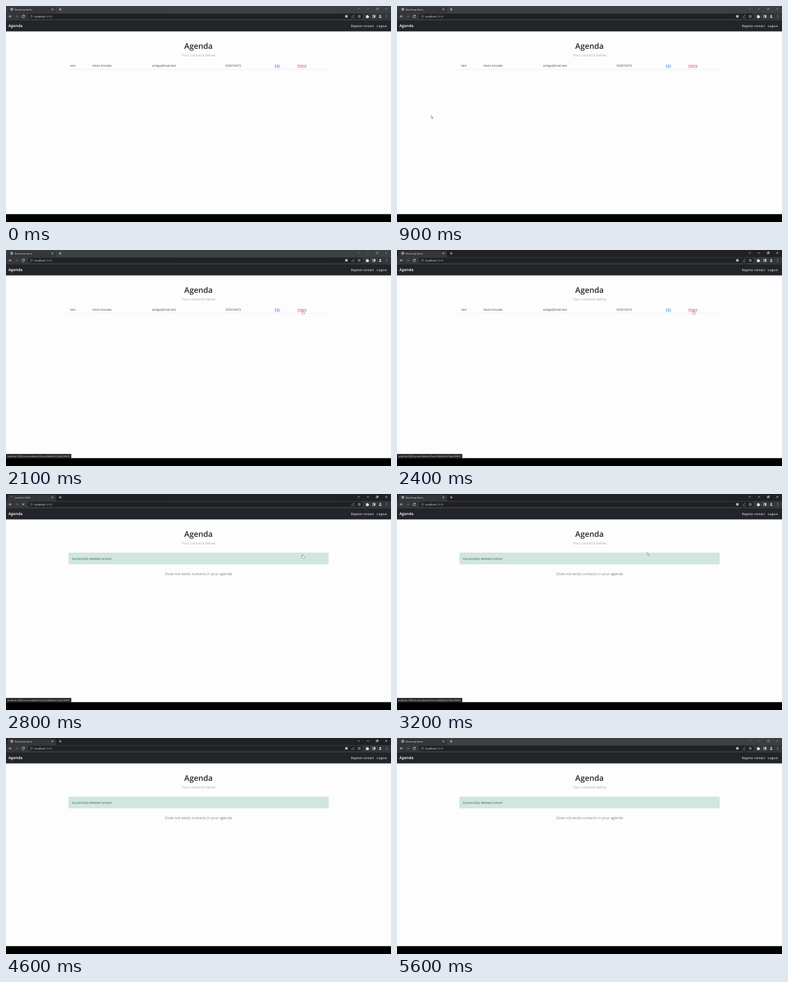
These frames come from a looping animation (600x338 px, 5.7 s). An HTML page:

```html
<!DOCTYPE html>
<html lang="en">
<head>
<meta charset="utf-8">
<title>Agenda</title>
<style>
html, body { margin: 0; width: 100%; height: 100%; overflow: hidden; background: #000; }
svg { display: block; width: 600px; height: 338px; font: 4.75px "Open Sans", "Noto Sans", sans-serif; text-rendering: geometricPrecision; }
.line { fill: none; stroke: #e8eaed; stroke-width: .65; }
.dim { stroke: #9aa0a6; }
.body { fill: #3b3f44; }
.lead { font-weight: 300; text-anchor: middle; }
.link { text-decoration: underline; }
.tab { font-size: 3.55px; fill: #e8eaed; }
.solid { fill: #e8eaed; }
</style>
</head>
<body>
<svg viewBox="0 0 600 338">
  <rect width="600" height="338"/>

  <!-- tab strip -->
  <rect id="strip" width="600" height="11.5"/>
  <path d="M0 11.5q2.4 0 2.4-2.4V3.4q0-2.2 2.2-2.2H75.6q2.2 0 2.2 2.2V9.1q0 2.4 2.4 2.4Z" fill="#35363a"/>
  <g id="globe">
    <circle cx="9" cy="5.2" r="1.9" class="line"/>
    <path d="M7.4 4.6 9 5.5 8.6 6.8M9.4 3.6 9.8 4.8 10.8 5" class="line" stroke-width=".5"/>
  </g>
  <path id="spinner" d="M9 3.3A1.9 1.9 0 0 1 10.9 5.2" class="line dim"/>
  <text id="title" x="13.8" y="6.5" class="tab"></text>
  <path d="M71.1 3.9 73.7 6.5M73.7 3.9 71.1 6.5M82.4 5.2h4.2M84.5 3.1v4.2" class="line"/>
  <g id="controls" class="line">
    <path d="M548 3.7 549.6 5.2 551.2 3.7M562.5 4.6h3.2M591.1 3.1 594.1 6.1M594.1 3.1 591.1 6.1"/>
    <path d="M577 3.8h2.3v2.3H577ZM577.8 3.8V3h2.3v2.3h-.8"/>
  </g>

  <!-- toolbar -->
  <rect y="11" width="600" height="12.3" fill="#35363a"/>
  <rect x="34" y="12.3" width="522" height="7.9" rx="3.95" fill="#202124"/>
  <path d="M9 16.2H4.8M6.8 14.2 4.8 16.2 6.8 18.2" class="line"/>
  <path d="M14.6 16.2h4.2M16.8 14.2 18.8 16.2 16.8 18.2" class="line" style="stroke:#74777b"/>
  <g id="reload">
    <path d="M28.3 14.8A2 2 0 1 0 28.9 16.7" class="line"/>
    <path d="M29 13.8V15.7H27.1Z" class="solid"/>
  </g>
  <path id="stop" d="M25.3 14.5 28.7 17.9M28.7 14.5 25.3 17.9" class="line"/>
  <circle cx="39.6" cy="16.2" r="1.8" class="line dim" style="stroke-width:.5"/>
  <path d="M39.6 15.9v1.2M39.6 15v.5" class="line dim" style="stroke-width:.5"/>
  <text x="44.2" y="17.7" font-size="4.15" fill="#f1f3f4">localhost<tspan fill="#9aa0a6">:3000</tspan></text>
  <rect id="translate" x="528.6" y="14.3" width="3.8" height="3.8" fill="#b6b9bd"/>
  <path d="M538.9 16v2.2h3.6V17M539.8 16.6Q540 15 542.6 14.9M541.5 13.8 542.7 14.9 541.5 16" class="line dim" style="stroke-width:.5"/>
  <path id="star" class="line" style="stroke-width:.5"/>
  <path d="M561 14.9h1.2a.8.8 0 0 1 1.6 0H565v1.2a.8.8 0 0 1 0 1.6v1h-4v-1.2a.8.8 0 0 0 0-1.4Z" class="solid"/>
  <path d="M571.3 14.4h3.8v3.7h-3.8Z" class="line"/>
  <path d="M573.4 14.4h1.8v3.7h-1.8ZM581.2 18.2q0-1.7 2-1.7t2 1.7Z" class="solid"/>
  <circle cx="583.2" cy="15" r="1.1" class="solid"/>
  <path d="M593.2 14v.8M593.2 15.8v.8M593.2 17.6v.8" class="line" style="stroke-width:.8"/>

  <!-- page -->
  <rect y="23.2" width="600" height="16.5" fill="#212529"/>
  <rect y="39.7" width="600" height="285.8" fill="#fdfdfe"/>
  <rect y="325.2" width="600" height=".6" fill="#b8d8c2"/>
  <g fill="#fff">
    <text x="3.8" y="33.3" font-size="6.05" font-weight="600">Agenda</text>
    <text x="537.5" y="32.8" font-size="4.8" font-weight="500">Register contact</text>
    <text x="578" y="32.8" font-size="4.8" font-weight="500">Logout</text>
  </g>
  <text x="300" y="67.2" font-size="12.2" font-weight="600" text-anchor="middle" fill="#212529">Agenda</text>
  <text x="300" y="79.4" font-size="5.8" class="lead" fill="#7b8187">Your contacts below</text>

  <g id="row" class="body">
    <text x="100" y="94.9">test</text>
    <text x="134.8" y="94.9">titulo trocado</text>
    <text x="227.8" y="94.9">amigo@mail.test</text>
    <text x="342" y="94.9">555010472</text>
    <text x="418.8" y="94.9" class="link" fill="#0d6efd">Edit</text>
    <text x="454" y="94.9" class="link" fill="#dc3545">Delete</text>
    <rect x="97" y="98.9" width="406" height=".4" fill="#d3d7db"/>
  </g>
  <g id="alert">
    <rect x="97.6" y="92" width="404.9" height="17.8" rx="1.3" fill="#d1e6dc" stroke="#bfdccf" stroke-width=".35"/>
    <text x="102.6" y="102.8" fill="#2d6049">Successfully deleted contact</text>
    <text x="300" y="127.1" font-size="5.85" class="lead body">Does not exists contacts in your agenda</text>
  </g>

  <g id="status">
    <rect y="319.2" width="101.7" height="6.6" fill="#202124"/>
    <text x="1.8" y="323.8" font-size="3.5" fill="#fff">localhost:3000/contact/delete/63ac4c5bb6b29e7a0a336b99</text>
  </g>

  <g id="pointer" stroke-linejoin="round">
    <path id="arrow" d="M0 0V5L1.2 3.9 2 5.6 2.8 5.2 2 3.6H3.6Z" fill="#fff" stroke="#44474b" stroke-width=".4"/>
    <path id="hand" d="M-.5.5Q0-.3.5.5V2.5L2.7 3Q3.2 3.3 3 4.4L2.5 6.3H-.2L-1.6 4Q-1.4 3.2-.5 4Z" fill="#fff" stroke="#44474b" stroke-width=".4"/>
    <path id="beam" d="M-1-2.9Q0-2.9 0-2.3 0-2.9 1-2.9M0-2.3V2.3M-1 2.9Q0 2.9 0 2.3 0 2.9 1 2.9" fill="none" stroke="#26302b" stroke-width=".55"/>
  </g>
</svg>
<script>
const LOOP = 5700, STEP = 100;
const el = id => document.getElementById(id);
const show = (id, on) => { el(id).style.display = on ? "" : "none"; };

// start time, shape, then one point per 100 ms; the last point holds
const moves = [
  [0, null],
  [300, "arrow", [27, 200], [33, 203], [38, 206]],
  [600, null],
  [900, "arrow", [53, 171], [112, 160], [210, 147], [320, 133], [420, 123], [464.4, 118]],
  [1500, "arrow", [465.3, 117], [465, 111], [464.2, 104]],
  [1800, "hand", [462.8, 97], [462.2, 94.5]],
  [3100, "arrow", [448, 96], [390, 91], [312, 88], [232, 91]],
  [3500, "beam", [164, 100], [160.5, 102.5], [156.2, 102.8]],
  [4200, "arrow", [215, 121], [345, 157], [485, 200], [586, 226]],
  [4600, null]
];

const starPoints = Array.from({ length: 10 }, (_, i) => {
  const a = i * Math.PI / 5 - Math.PI / 2, r = i % 2 ? 1 : 2.2;
  return (550.5 + r * Math.cos(a)).toFixed(2) + " " + (16.3 + r * Math.sin(a)).toFixed(2);
});
el("star").setAttribute("d", "M" + starPoints.join("L") + "Z");

function drawPointer(t) {
  const [start, shape, ...points] = moves.findLast(m => m[0] <= t);
  for (const id of ["arrow", "hand", "beam"]) show(id, id === shape);
  if (!shape) return;
  const i = Math.min(points.length - 1, Math.floor((t - start) / STEP));
  el("pointer").setAttribute("transform", `translate(${points[i]})`);
}

function draw(now) {
  const t = Math.floor((now % LOOP) / STEP) * STEP;
  const between = (a, b) => t >= a && t < b;
  const focused = between(2400, 5600);
  const loading = between(2500, 2900);
  const committed = between(2700, 2900);
  const deleted = t >= 2700;

  el("strip").setAttribute("fill", focused ? "#202124" : "#3c4043");
  el("controls").style.stroke = focused ? "#e8eaed" : "#85888c";
  el("title").textContent = committed ? "localhost:3000" : "Bootstrap demo";
  show("globe", !loading);
  show("spinner", loading);
  el("spinner").setAttribute("transform", `rotate(${(t - 2800) * .5 - 60} 9 5.2)`);
  show("reload", !loading);
  show("stop", loading);
  show("translate", !committed);
  show("row", !deleted);
  show("alert", deleted);
  show("status", between(2100, 3400));
  drawPointer(t);
}

function tick() {
  draw(performance.now());
  requestAnimationFrame(tick);
}
tick();
</script>
</body>
</html>
```
